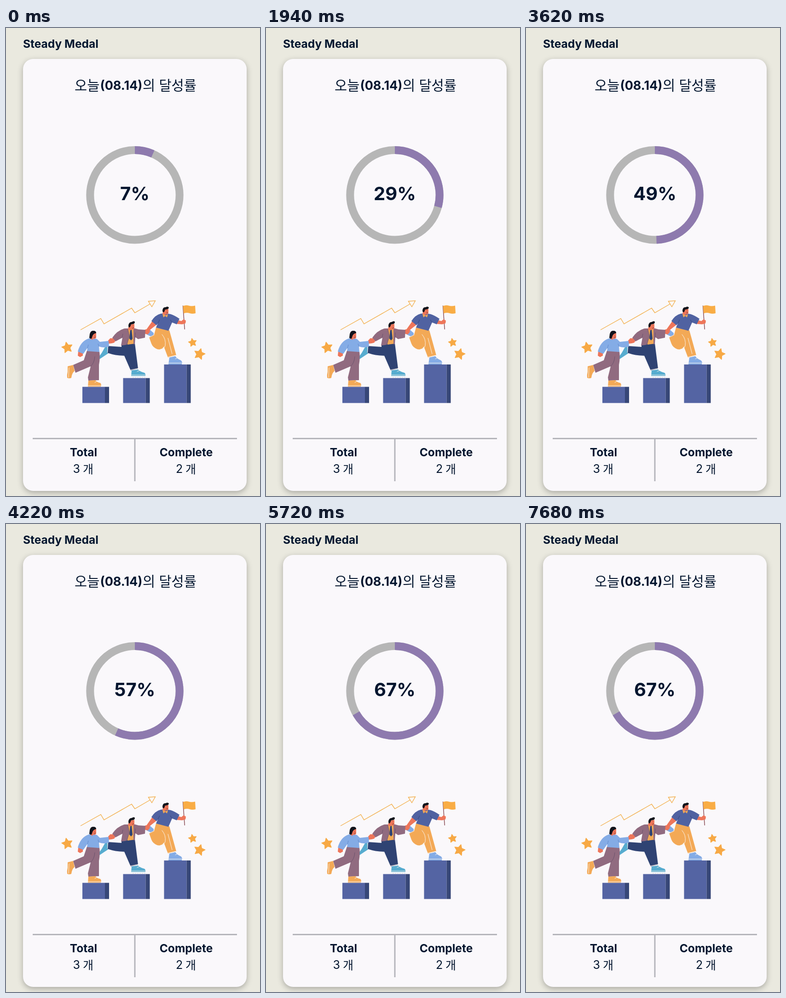
Animation, 552 px wide and 1014 px high, one loop 7.78 s. Source, as an HTML page:

```html
<!DOCTYPE html>
<html lang="ko">
<head>
<meta charset="utf-8">
<title>Steady Medal</title>
<style>
  html, body { margin: 0; width: 100%; height: 100%; overflow: hidden; background: #eae9df; }
  .card {
    position: absolute; left: 37px; top: 67px; width: 486px; height: 936px;
    border-radius: 22px; background: #faf8fb; box-shadow: 0 4px 13px rgba(0, 0, 0, .28);
  }
  svg { position: absolute; left: 0; top: 0; display: block; width: 552px; height: 1014px; }
  text { font-family: Inter, "Noto Sans CJK KR", "Noto Sans CJK", sans-serif; fill: #03162f; font-weight: 700; }
  .mid { text-anchor: middle; }
  .ko { font-family: "Noto Sans CJK KR", "Noto Sans CJK", sans-serif; font-weight: 300; }
  .thin { font-weight: 100; }
  .num { font-weight: 400; }
  .ink { fill: #11131b; }
  .skin { fill: #ee765a; }
  .sky { fill: #84ace6; }
  .mauve { fill: #916b80; }
  .navy { fill: #2f4373; }
  .blue { fill: #5062a1; }
  .gold { fill: #f3a956; }
  .teal { fill: #57accf; }
  .trim { fill: none; stroke: #fbf3ea; stroke-width: 1; stroke-linecap: round; }
  .fold { fill: none; stroke: #5c4964; stroke-width: .7; stroke-linecap: round; }
  .face { fill: none; stroke: #42252a; stroke-width: .9; }
</style>
</head>
<body>
<div class="card"></div>
<svg viewBox="0 0 552 1014">
  <text x="37" y="43" font-size="24.5">Steady Medal</text>

  <text class="ko" x="149" y="135" font-size="29.500">오늘</text>
  <text class="mid" x="250.500" y="133.500" font-size="27">(08.14)</text>
  <text class="ko" x="297" y="135" font-size="29.500">의 달성률</text>

  <g fill="none" stroke-width="17">
    <circle cx="280" cy="361.800" r="97.200" stroke="#b6b6b6"/>
    <circle id="arc" cx="280" cy="361.800" r="97.200" stroke="#8e7aae" pathLength="100"
      stroke-dasharray="6.6 100" transform="rotate(-90 280 361.8)"/>
  </g>
  <text id="pct" class="mid" x="280" y="373" font-size="40">7%</text>

  <g fill="none" stroke="#f3b04f" stroke-width="1.4">
    <path d="M162 654L206 629.500L213 641L273 607L280 617L313 598"/>
    <path d="M309.500 592L324.500 591L317 604Z"/>
  </g>
  <g id="stars" fill="#f7a945" stroke="#f7a945" stroke-width="1.500" stroke-linejoin="round"></g>
  <g id="steps"></g>

  <!-- right figure -->
  <path d="M384.500 601.500L388.300 653" stroke="#8b4f57" stroke-width="1.5"/>
  <path fill="#f9ad45" d="M384.500 602.500Q391 599.500 397 601.500T411 601.500L412 618Q405 620 399 618T386 618.500Z"/>
  <path class="sky" d="M301 661Q304 653 312 653L321 661L320 669Q311 668 301 661Z"/>
  <path class="gold" d="M326 649L355 655L370 709L352 714L343 690Q339 698 329 696Q319 692 316 684L311 670L322 664Z"/>
  <path class="trim" d="M311.500 670L322 665M352 713L370 709M339 664Q348 674 346 688Q344 696 336 696M352 672L361 706"/>
  <path class="skin" d="M318 635L327 643L313 654L311 661L303 663L300 657L306 652Z"/>
  <path class="skin" d="M371 632L381 635L386 631L391 634L390 640L383 642L370 641Z"/>
  <path class="blue" d="M336 619Q346 617 358 620Q367 623 377 630L371 642L361 638L353 656L326 649L330 640L327 644L316 635Q324 622 336 619Z"/>
  <path d="M330 640L334 632M361 638L357 632" stroke="#34457a" stroke-width=".9"/>
  <path class="skin" d="M342 609L353 609L353 618Q350 621 347 620L346 623L340 620Z"/>
  <path class="ink" d="M340 612Q341 604 347 605Q352 602 354 606Q353 610 346 610L344 615L342 616Q340 615 340 612Z"/>
  <path class="face" d="M349 612.500l.8.4M351.500 616.500l-3 .8"/>
  <path class="gold" d="M340 619L346 623L352 620L350 627L346 624L342 627Z"/>
  <path class="sky" d="M355 714L368 711Q372 717 380 720Q384 723 382 729H353Z"/>
  <path class="trim" d="M354 726H382M368 717L372 715"/>

  <!-- middle figure -->
  <path class="teal" d="M221 687L222 705L204 717Q201 716 203 711L208 704L216 690Z"/>
  <path class="navy" d="M251 684L280 683L287 738L271 742L257 710Q238 710 221 704L222 689L251 691Z"/>
  <path class="trim" d="M270 741L287 737.500M221 690L220.500 703"/>
  <path class="skin" d="M232 672L238 677L235 682L227 683L223 678L226 673Z"/>
  <path class="skin" d="M299 656L303 653L309 653L313 658L308 664L301 662Z"/>
  <path class="gold" d="M264 652L278 651L279 684L264 686Z"/>
  <path class="navy" d="M270 654L273 654L275 673L272 677L268 673Z"/>
  <path class="mauve" d="M258 651L265 651L268 668L263 686L250 688L253 671L238 679L231 671Q242 655 258 651Z"/>
  <path class="mauve" d="M277 650L288 653L303 654L302 671L287 674L281 670L280 685L277 685Z"/>
  <path class="fold" d="M252 671L254 663M281 670L281 660M265 653L268 668L263 685"/>
  <path class="skin" d="M268 643L279 641L279 651Q276 655 272 653L270 656L265 652Z"/>
  <path class="ink" d="M266 645Q267 637 273 637Q280 633 280 638Q279 642 272 642L270 647L268 649Q266 648 266 645Z"/>
  <path class="face" d="M275 645l.8.4M277.500 649.500l-3 .8"/>
  <path class="teal" d="M273 742L287 740Q292 745 301 747Q304 750 303 754H272Z"/>
  <path class="trim" d="M272 752H303M285 744L290 742.500"/>
  <path d="M275 757H303" stroke="#d9d8dd" stroke-width="1.200" stroke-dasharray="3 2"/>

  <!-- left figure -->
  <path class="gold" d="M134 733L146 730L149 743Q143 748 142 758Q138 760 133 758Q132 752 134 745Z"/>
  <path class="trim" d="M137 736L136 757"/>
  <path class="mauve" d="M176 699L203 701Q205 714 202 730V763L179 764L178 757L184 733L151 747L146 730L169 720Z"/>
  <path class="fold" d="M184 733Q192 726 193 712"/>
  <path class="skin" d="M157 701L167 704L167 710L161 713L156 710Z"/>
  <path class="skin" d="M222 677L227 672L235 675L237 679L231 683L223 684Z"/>
  <path class="sky" d="M179 673Q188 670 198 674L204 680L223 678L224 690Q213 694 202 690L203 702L176 700L177 693L168 706L156 701Q162 679 179 673Z"/>
  <path d="M177 694L179 686M202 690L200 684" stroke="#5b80c4" stroke-width=".8"/>
  <path class="skin" d="M186 660L196 661L196 671Q193 675 189 673L188 676L183 673Z"/>
  <path class="ink" d="M182 663Q184 655 190 656Q196 656 196 661Q190 662 188 667L186 673Q182 673 181 671Z"/>
  <path class="face" d="M192 666l.8.4M194.500 669.500l-3 1"/>
  <path class="gold" d="M179 764L194 763Q198 768 205 769Q208 772 206 777H178Z"/>
  <path class="trim" d="M178 775H206M193 768L197 766"/>

  <path d="M58 889.500H502M280 889.500V982" fill="none" stroke="#b5b5bb" stroke-width="3"/>
  <g class="mid" font-size="24.500">
    <text x="168.500" y="928">Total</text>
    <text x="391.500" y="928">Complete</text>
  </g>
  <g font-size="25">
    <text class="num" x="145.500" y="964">3</text>
    <text class="num" x="369" y="964">2</text>
    <text class="ko thin" x="167" y="965">개</text>
    <text class="ko thin" x="390" y="965">개</text>
  </g>
</svg>
<script>
  const LOOP = 7780, GOAL = 200 / 3;
  const $ = id => document.getElementById(id);

  const star = (cx, cy, r, turn) => {
    const pts = [];
    for (let i = 0; i < 10; i++) {
      const a = (turn - 90 + i * 36) * Math.PI / 180, d = i % 2 ? r * .5 : r;
      pts.push((cx + d * Math.cos(a)).toFixed(1) + ',' + (cy + d * Math.sin(a)).toFixed(1));
    }
    return `<polygon points="${pts.join(' ')}"/>`;
  };
  $('stars').innerHTML = star(133, 692.5, 12, -12) + star(405.5, 681.5, 9, -10) + star(420.5, 706.5, 12.2, 15);

  const step = (x, y) =>
    `<path fill="#5464a3" d="M${x} ${y}h49V812.500h-49z"/><path fill="#374777" d="M${x + 49} ${y}h9V812.500h-9z"/>`;
  $('steps').innerHTML = step(166, 777.5) + step(254.5, 758.5) + step(343.5, 729);

  // Progress rests for the last 100 ms of every 840 ms.
  const rest = t => {
    const s = t + 20, p = s % 840;
    return s - p + Math.min(p, 740) - 20;
  };
  const progress = t => Math.min(GOAL, 6.6 + .01155 * t + 7.5e-8 * t * t);

  function draw() {
    const v = progress(rest(performance.now() % LOOP));
    $('arc').setAttribute('stroke-dasharray', v.toFixed(2) + ' 100');
    $('pct').textContent = Math.round(v) + '%';
    requestAnimationFrame(draw);
  }
  draw();
</script>
</body>
</html>
```
